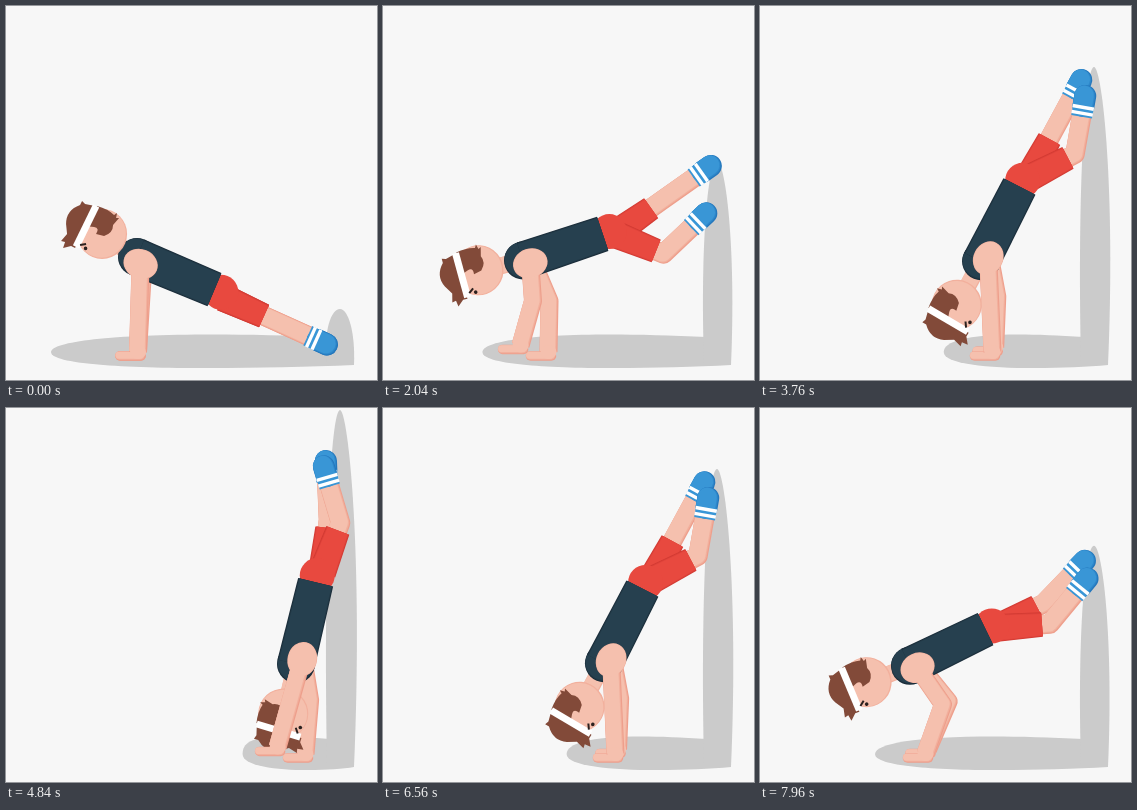
Recreate the animation shown at these times as an HTML page with a canvas. Size 371 by 374 pixels, loop 8000 ms.

```html
<!DOCTYPE html>
<html lang="en">
<head>
<meta charset="utf-8">
<title>Wall walk</title>
<style>
  html, body { margin: 0; width: 100%; height: 100%; overflow: hidden; background: #f7f7f7; }
  canvas { display: block; width: 371px; height: 374px; }
</style>
</head>
<body>
<canvas id="stage" width="371" height="374"></canvas>
<script>
const ctx = document.getElementById('stage').getContext('2d');
const LOOP = 8000, APEX = 5160, CYCLE = 700;
const START_TILT = 22.8, TURN = 99.3;
const THIGH = 53, SHIN = 58;

// [edge, middle, main]
const SKIN = ['#ee9f8c', '#f2b09d', '#f5c0ae'];
const TANK = ['#1a2c39', '#213846', '#26404f'];
const RED = ['#d23a32', '#de423a', '#e8493f'];
const BLUE = ['#2477bc', '#2e88cb', '#3996d6'];
const HAIR = '#824a39', INK = '#2b211f', SHADE = '#cbcbcb';

// Time, chest x and spine angle; everything else follows from them.
const BODY = [[0, 131, 22.8], [1320, 128, 8.3], [2040, 140, -18.5], [2360, 150, -26], [3760, 221, -62.8], [4840, 290, -76.5]];

const clamp = v => Math.max(0, Math.min(1, v));
const smooth = p => p * p * (3 - 2 * p);
const along = (p, u, d) => [p[0] + u[0] * d, p[1] + u[1] * d];
const side = u => [-u[1], u[0]];

function unit(a, b) {
  const dx = b[0] - a[0], dy = b[1] - a[1], d = Math.hypot(dx, dy) || 1;
  return [dx / d, dy / d];
}

function sample(rows, t) {
  let i = 1;
  while (i < rows.length - 1 && t > rows[i][0]) i++;
  const a = rows[i - 1], b = rows[i];
  const p = clamp((t - a[0]) / (b[0] - a[0]));
  return a.slice(1).map((v, k) => v + (b[k + 1] - v) * p);
}

// A limb moves in the first half of each cycle and rests in the second.
function gait(t, delay) {
  const c = Math.max(0, (t - delay) / CYCLE);
  const p = clamp(c % 1 * 2);
  return { count: Math.floor(c) + smooth(p), lift: Math.sin(Math.PI * p) };
}

function handAt(t, delay) {
  const { count, lift } = gait(t, delay);
  return [132 + 33.5 * Math.min(5, count), 346 - (count < 5 ? 9 * lift : 0)];
}

function footAt(t, delay, reach) {
  const { count, lift } = gait(t, delay);
  const climb = clamp(count * reach / 7);
  return [320 + 7 * Math.sin(Math.PI * climb) - (climb < 1 ? 4 * lift : 0), 54 + 284 * (1 - climb) ** 1.5];
}

function kneeAt(hip, foot) {
  const d = Math.hypot(foot[0] - hip[0], foot[1] - hip[1]);
  const a = d < THIGH + SHIN ? (THIGH ** 2 - SHIN ** 2 + d * d) / (2 * d) : d * THIGH / (THIGH + SHIN);
  const u = unit(hip, foot);
  return along(along(hip, u, a), side(u), Math.sqrt(Math.max(0, THIGH ** 2 - a * a)));
}

function fill(path, color) {
  ctx.fillStyle = color;
  ctx.fill(new Path2D(path));
}

function line(points, width, color, cap = 'butt') {
  ctx.beginPath();
  points.forEach(p => ctx.lineTo(p[0], p[1]));
  ctx.lineWidth = width;
  ctx.lineCap = cap;
  ctx.lineJoin = 'round';
  ctx.strokeStyle = color;
  ctx.stroke();
}

function limb(points, width, tones, cap) {
  tones.forEach((c, i) => line(points.map(p => [p[0] - i * .5, p[1] - i * .4]), width - i * 1.3, c, cap));
}

function oval([x, y], rx, ry, color, angle = 0) {
  ctx.beginPath();
  ctx.ellipse(x, y, rx, ry, angle, 0, 7);
  ctx.fillStyle = color;
  ctx.fill();
}

function taper(a, b, wa, wb, tones) {
  const n = side(unit(a, b));
  tones.forEach((c, i) => {
    const ra = wa / 2 - i * .8, rb = wb / 2 - i * .8;
    const pts = [along(a, n, ra), along(b, n, rb), along(b, n, -rb), along(a, n, -ra)];
    fill('M' + pts.map(p => p.join()).join('L') + 'Z', c);
  });
}

function drawShadow(t) {
  const s = t / 1000;
  const left = 45 + 49 * Math.max(0, Math.min(s, 4.84) - .93);
  const top = Math.max(2, 267 - 54.8 * s + 36 * Math.max(0, 1 - s));
  const mid = (left + 322) / 2, height = 359 - top, rise = 359 - .6 * height;
  fill(`M348 359C${mid + 40} 364 ${left} 365 ${left} 346C${left} 332 ${mid - 30} 324 324 331L348 345Z`, SHADE);
  fill(`M321 359C317 ${rise} 325 ${top} 334 ${top}C342 ${top} ${348 + height * .026} ${rise} 348 359Z`, SHADE);
}

function drawArm(shoulder, hand, bend) {
  const u = unit(shoulder, hand);
  const d = Math.hypot(hand[0] - shoulder[0], hand[1] - shoulder[1]);
  const elbow = along(along(shoulder, u, d * .45), side(u), -bend);
  limb([[hand[0] - 18, hand[1] + 4], [hand[0] + 3, hand[1] + 4]], 9.5, SKIN, 'round');
  limb([shoulder, elbow, hand], 18, SKIN);
  oval(hand, 8, 7, SKIN[2]);
}

function drawLeg(hip, foot) {
  const knee = kneeAt(hip, foot);
  const down = unit(hip, knee), u = unit(knee, foot);
  limb([along(hip, down, 38), knee, foot], 19.5, SKIN);
  limb([along(foot, u, -9), along(foot, u, 1)], 22, BLUE, 'round');
  line([along(foot, u, -20), along(foot, u, -8)], 21, BLUE[2]);
  for (const d of [-16.5, -10.5]) line([along(foot, u, d - 1.7), along(foot, u, d + 1.7)], 21.5, '#fff');
  taper(hip, along(hip, down, 45), 28, 24.5, RED);
}

function drawHead([x, y], angle) {
  ctx.save();
  ctx.translate(x, y);
  ctx.rotate(angle);
  oval([2, 0], 25, 25, SKIN[1]);
  oval([1.5, -.5], 24.3, 24.3, SKIN[2]);
  fill('M-5 -28L-15 -30L-18 -33L-20 -29Q-34 -24 -34 -10L-33 0L-39 7L-35 8L-37 14L-29 12L-25 14Z', HAIR);
  fill('M-3 -28Q8 -25 14 -19L17 -21L16 -16L19 -16L13 -9Q13 -1 4 2L-4 0Q0 -6 -6 -7L-15 -8Z', HAIR);
  line([[-4, -28], [-24, 13]], 7, '#fff');
  line([[-20, 11], [-14, 10]], 2, INK);
  oval([-14.5, 14.5], 1.8, 1.8, INK);
  ctx.restore();
}

function draw(time) {
  const t = time <= APEX ? time : 2 * APEX - time;
  const [chestX, tilt] = sample(BODY, t);
  const turned = (START_TILT - tilt) / TURN;
  const bend = 22 * Math.exp(-(((t - 2360) / 300) ** 2));
  const angle = tilt * Math.PI / 180;
  const spine = [Math.cos(angle), Math.sin(angle)], belly = side(spine);

  const chest = [chestX, 251 + 5 * turned + bend * .2];
  const waist = along(chest, spine, 84);
  const seat = along(waist, spine, 7);
  const hip = along(along(waist, spine, 11), belly, 4);
  const shoulder = along(along(chest, spine, 6), belly, 5);
  const head = along(along(chest, spine, -43 - 10 * turned), belly, 7 * turned - 7);

  ctx.fillStyle = '#f7f7f7';
  ctx.fillRect(0, 0, 371, 374);
  drawShadow(t);
  drawArm(along(shoulder, spine, 3), handAt(t, 1600), bend + 6 * turned);
  limb([head, chest], 17, SKIN.slice(1));
  drawLeg(hip, footAt(t, 175, 1.12));
  drawLeg(hip, footAt(t, 525, 1.04));
  oval(seat, 17.5, 17.5, RED[2]);
  TANK.forEach((c, i) => oval([chest[0] - i * .4, chest[1] - i * .4], 19 - i * .8, 19 - i * .8, c));
  taper(chest, waist, 38, 36, TANK);
  drawHead(head, angle - START_TILT * Math.PI / 180);
  oval(shoulder, 17.5, 14.8, SKIN[1], angle);
  drawArm(shoulder, handAt(t, 1950), bend);
  oval(shoulder, 17, 14.2, SKIN[2], angle);
}

const began = performance.now();
function tick() {
  draw((performance.now() - began) % LOOP);
  requestAnimationFrame(tick);
}
tick();
</script>
</body>
</html>
```
